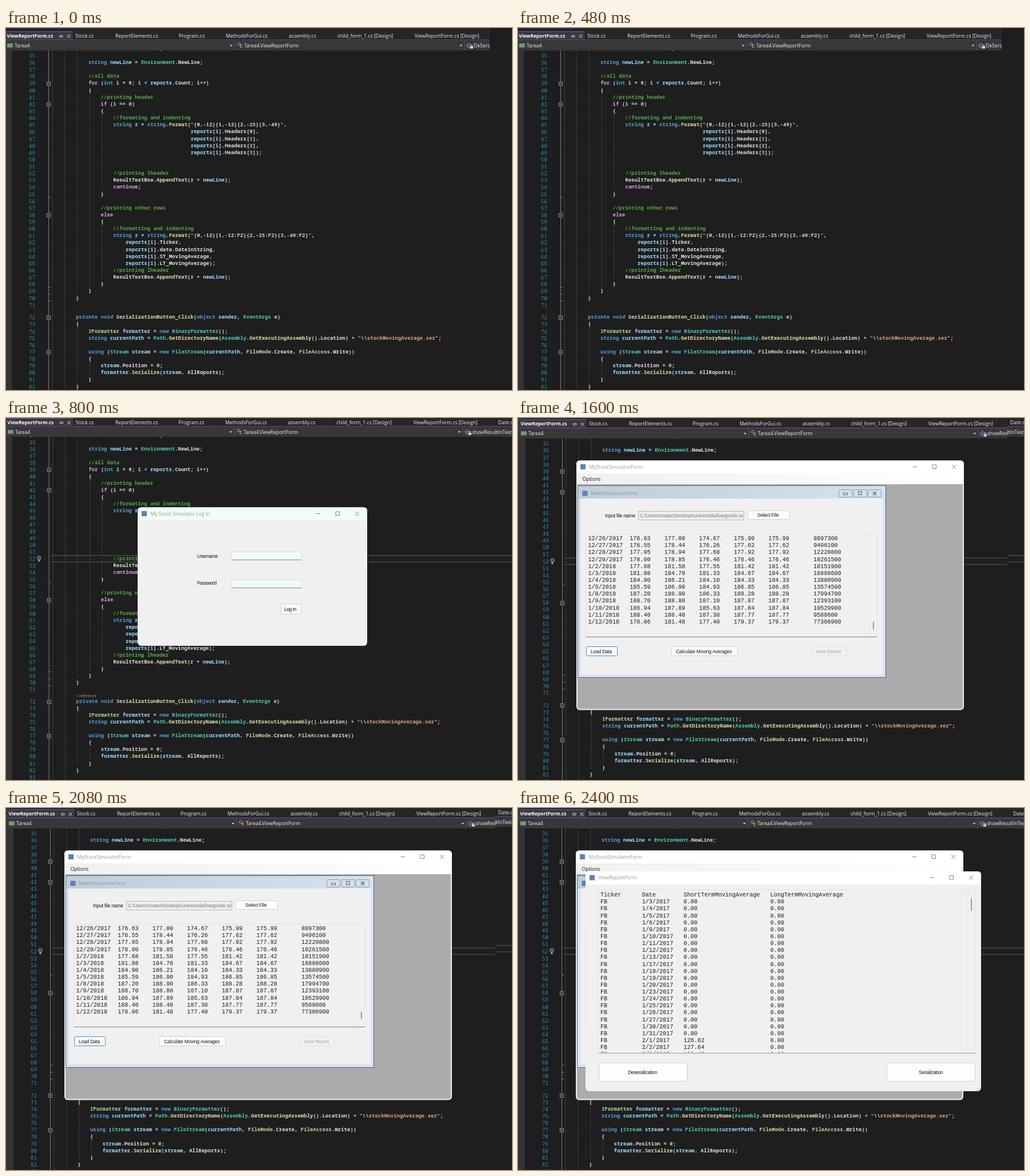
Write an HTML page that moves like this. It is 884 px wide and 634 px high and loops after 3.2 s.

```html
<!DOCTYPE html>
<html lang="en">
<head>
<meta charset="utf-8">
<title>Stock simulator demo</title>
<style>
html, body { margin: 0; width: 100%; height: 100%; overflow: hidden; background: #1e1e1e; }
svg { display: block; width: 884px; height: 634px; }
text { white-space: pre; }
.code { font: 600 9.033px "Noto Sans Mono", "DejaVu Sans Mono", monospace; fill: #dcdcdc; }
.num { font: 500 9.033px "Noto Sans Mono", "DejaVu Sans Mono", monospace; fill: #2b91af; }
.ui { font: 8.62px "Open Sans", "Noto Sans", sans-serif; fill: #f0f0f0; }
.form { font: 8.3px "Liberation Sans", Arial, sans-serif; letter-spacing: -.12px; fill: #111; }
.data { font: 10.1px "Liberation Mono", "Courier New", monospace; fill: #1c1c1c; }
</style>
</head>
<body>
<svg id="stage" viewBox="0 0 884 634"></svg>
<script>
const LOOP = 3200, HOLD = 800;
const CHAR = 5.42, PITCH = 12.13, FIRST = 34;

const source = String.raw`
    ResultTextBox.Text = "";

    string newLine = Environment.NewLine;

    //all data
    for (int i = 0; i < reports.Count; i++)
    {
        //printing header
        if (i == 0)
        {
            //formating and indenting
            string r = string.Format("{0,-12}{1,-12}{2,-25}{3,-49}",
                                     reports[i].Headers[0],
                                     reports[i].Headers[1],
                                     reports[i].Headers[2],
                                     reports[i].Headers[3]);


            //printing lheader
            ResultTextBox.AppendText(r + newLine);
            continue;
        }

        //printing other rows
        else
        {
            //formatting and indenting
            string r = string.Format("{0,-12}{1,-12:F2}{2,-25:F2}{3,-49:F2}",
                reports[i].Ticker,
                reports[i].date.DateInString,
                reports[i].ST_MovingAverage,
                reports[i].LT_MovingAverage);
            //printing lheader
            ResultTextBox.AppendText(r + newLine);
        }
    }
}

private void SerializationButton_Click(object sender, EventArgs e)
{
    IFormatter formatter = new BinaryFormatter();
    string currentPath = Path.GetDirectoryName(Assembly.GetExecutingAssembly().Location) + "\\stockMovingAverage.ser";

    using (Stream stream = new FileStream(currentPath, FileMode.Create, FileAccess.Write))
    {
        stream.Position = 0;
        formatter.Serialize(stream, AllReports);
    }
}
`.slice(1).split("\n");

const palette = {};
const paint = (color, words) => words.split(" ").forEach(w => palette[w] = color);
paint("#569cd6", "string int private void object new using");
paint("#d8a0df", "for if else continue");
paint("#4ec9b0", "Environment BinaryFormatter Path Assembly EventArgs Stream FileStream");
paint("#b8d7a3", "IFormatter FileMode FileAccess");
paint("#dcdcaa", "Format AppendText SerializationButton_Click GetDirectoryName GetExecutingAssembly Serialize");
paint("#9cdcfe", "newLine i reports r sender e formatter currentPath stream");

const esc = s => s.replace(/&/g, "&amp;").replace(/</g, "&lt;");
const span = (color, s) => `<tspan fill="${color}">${esc(s)}</tspan>`;
const rect = (x, y, w, h, fill, more = "") =>
  `<rect x="${x}" y="${y}" width="${w}" height="${h}" fill="${fill}" ${more}/>`;
const box = (x, y, w, h, fill, stroke, r = 0) =>
  rect(x + .5, y + .5, w - 1, h - 1, fill, `stroke="${stroke}" rx="${r}"`);
const path = (d, stroke, more = "") => `<path d="${d}" fill="none" stroke="${stroke}" ${more}/>`;
// y is the middle of the capitals
const text = (cls, x, y, s, more = "") =>
  `<text xml:space="preserve" class="${cls}" x="${x}" y="${y + 3.1}" ${more}>${s}</text>`;
const fill = c => `style="fill:${c}"`;

function tint(token) {
  if (token.startsWith("//")) return span("#57a64a", token);
  if (token.startsWith('"\\\\')) return span("#d69d85", '"') + span("#ffd68f", "\\\\") + span("#d69d85", token.slice(3));
  if (token.startsWith('"{')) return span("#d69d85", '"') + span("#cfd8bc", token.slice(1, -1)) + span("#d69d85", '"');
  if (token[0] === '"') return span("#d69d85", token);
  if (/^\d/.test(token)) return span("#b5cea8", token);
  return span(palette[token] || "#dcdcdc", token);
}
const highlight = s => s.match(/\/\/.*|"[^"]*"|\w+|[^\w"]+/g).map(tint).join("");

// the method on line 72 sits lower, below its reference note
const lineY = n => n < 72 ? 60 + PITCH * (n - 36) : 506.2 + PITCH * (n - 72);

function codeArea() {
  let out = rect(-10, -20, 920, 720, "#1e1e1e") + rect(-10, -20, 20, 720, "#333333");
  const guide = (x, a, b) => path(`M${x} ${a}V${b}`, "#5c5c5c", 'stroke-dasharray="2.4 2.4"');
  out += guide(81, 39, 660) + guide(102.8, 39, 660);
  out += guide(124.5, 39, lineY(70) - 7) + guide(124.5, lineY(74) - 6, lineY(82) - 7);
  out += guide(146.2, lineY(41) - 6, lineY(69) - 7) + guide(146.2, lineY(79) - 6, lineY(81) - 7);
  out += guide(167.9, lineY(44) - 6, lineY(55) - 7) + guide(167.9, lineY(60) - 6, lineY(68) - 7);
  out += path("M74.5 39V660", "#8a8a8a", 'stroke-width=".9"');
  for (const n of [55, 68, 69, 70]) out += path(`M74.5 ${lineY(n) + 6}h3.5`, "#8a8a8a");
  for (const n of [39, 42, 58, 72, 77]) {
    const y = lineY(n) + 1;
    out += rect(71.5, y - 3, 6, 6, "#1e1e1e", 'stroke="#a5a5a5" stroke-width=".9"') + path(`M73 ${y}h3`, "#d0d0d0", 'stroke-width=".9"');
  }
  source.forEach((s, k) => {
    const n = FIRST + k, y = lineY(n);
    out += text("num", 40, y + 1, n);
    if (s) out += text("code", 122.2 + CHAR * s.search(/\S/), y, highlight(s.trim()));
  });
  return out;
}

function header() {
  const tabs = [[118, 121, "Stock.cs"], [187, 191, "ReportElements.cs"], [298, 302, "Program.cs"],
    [381, 384, "MethodsForGui.cs"], [490, 494, "assembly.cs"], [575, 579, "child_form_1.cs [Design]"],
    [710, 714, "ViewReportForm.cs [Design]"], [860, 863, "Date.cs"]];
  let out = rect(-10, -20, 920, 41, "#272727");
  out += rect(-10, 6.5, 127, 14.5, "#383838") + rect(-10, 6, 127, 1, "#6a5bd0");
  out += text("ui", 1.5, 14, "ViewReportForm.cs", 'style="font-weight:700;font-size:8.4px;fill:#fff"');
  out += path("M92 14.5h3M95 12v5M95 13h4v3h-4", "#d0d0d0", 'stroke-width=".9"');
  out += path("M106.5 11.5l6 6m0 -6l-6 6", "#e8e8e8");
  for (const [edge, x, name] of tabs)
    out += rect(edge - .5, 7, 1, 13, "#1f1f1f") + text("ui", x, 14, name);
  out += rect(-10, 20.4, 920, 1.1, "#6153bb") + rect(-10, 21.5, 920, 17.7, "#383838");
  out += rect(2, 27, 10, 7, "#6f9b72") + text("ui", 15, 31, "Tarea4");
  out += text("ui", 416, 31, "Tarea4.ViewReportForm");
  for (const x of [393.5, 795]) out += `<path d="M${x - 2.5} 29.5h5l-2.5 2.8z" fill="#d8d8d8"/>`;
  for (const x of [400, 801]) out += rect(x - .5, 22, 1, 17, "#555555");
  out += path("M404 28l3 -3 3 3 -3 3zM408 30h5M410 30v4h3", "#d9ad62");
  out += path("M805 29l3.5 -2.5 3.5 2.5v3.5l-3.5 2.5 -3.5 -2.5zM805 29l3.5 2 3.5 -2M808.5 31v4", "#a98bd8", 'stroke-width=".9"');
  return out + rect(811, 32, 5, 4, "#d8d8d8") + path("M812 32v-2h3v2", "#d8d8d8", 'stroke-width=".8"');
}

function caretLine() {
  return path("M78.5 248.8H910M78.5 260H910", "#484848", 'stroke-width="1.5"') +
    '<circle cx="57" cy="253" r="3.3" fill="#4d4a40" stroke="#a39c88"/>' + rect(55.6, 256.5, 2.8, 3, "#a8a8a8") +
    text("ui", 122, 496, "1 reference", 'style="font-size:6.7px;fill:#a0a0a0"');
}

const editor = (matrix, member, caret) =>
  `<g transform="matrix(${matrix})"><use href="#code"/>${caret ? '<use href="#caret"/>' : ""}` +
  `<use href="#header"/>${text("ui", 817, 31, member)}</g>`;

const icon = (x, y) => rect(x - 4.5, y - 4.5, 9, 9, "#5f7fae");

function win(x, y, w, h, bar, title) {
  const r = x + w, m = y + 11;
  return rect(x, y, w, h, "#f0f0f0", 'rx="6"') +
    `<path d="M${x} ${y + 23}v-17q0 -6 6 -6h${w - 12}q6 0 6 6v17z" fill="${bar}"/>` +
    icon(x + 11.5, m) + text("ui", x + 22.5, m, title, fill("#999")) +
    path(`M${r - 89.5} ${m}h7.5M${r - 55} ${m - 3.5}h6.5v6.5h-6.5zM${r - 21} ${m - 3.5}l7 7m0 -7l-7 7`, "#777", 'stroke-width=".9"');
}

const button = (x, y, w, h, tx, label, border = "#cfcfcf", more = "") =>
  box(x, y, w, h, "#fdfdfd", border, 2) + text("form", tx, y + h / 2, label, more);

const field = (x, y, w, h, bg) =>
  box(x, y, w, h, bg, "#d9d9d9", 1) + path(`M${x + 1} ${y + h - .5}h${w - 2}`, "#868686");

function login() {
  const tight = 'style="letter-spacing:-.32px"', mint = "#f0fdf4";
  return win(230, 156.5, 401, 242.5, mint, "My Stock Simulator Log In") +
    text("form", 334, 242, "Username", tight) + field(393, 234, 124, 15, mint) +
    text("form", 334, 288.5, "Password", tight) + field(393, 283, 124, 15, mint) +
    box(480, 325, 36, 19, mint, "#cfcfcf", 2) + text("form", 486, 334.5, "Log In", tight);
}

const prices = `12/26/2017 176.63 177.00 174.67 175.99 8897300
12/27/2017 176.55 178.44 176.26 177.62 9496100
12/28/2017 177.95 178.94 177.68 177.92 12220800
12/29/2017 178.00 178.85 176.46 176.46 10261500
1/2/2018 177.68 181.58 177.55 181.42 18151900
1/3/2018 181.88 184.78 181.33 184.67 16886600
1/4/2018 184.90 186.21 184.10 184.33 13880900
1/5/2018 185.59 186.90 184.93 186.85 13574500
1/8/2018 187.20 188.90 186.33 188.28 17994700
1/9/2018 188.70 188.80 187.10 187.87 12393100
1/10/2018 186.94 187.89 185.63 187.84 10529900
1/11/2018 188.40 188.40 187.38 187.77 9588600
1/12/2018 178.06 181.48 177.40 179.37 77306900`.split("\n").map(s => s.split(" "));

const columns = (cells, widths) => cells.map((c, k) => c.padEnd(widths[k] || 0)).join("");

function mainForm() {
  let out = win(102, 74.5, 677, 437, "#fff", "MyStockSimulatorForm");
  out += rect(102, 97, 677, 19, "url(#menu)") + text("ui", 112.5, 107, "Options", fill("#111"));
  out += '<path d="M104 116H777V505q0 4.5 -4.5 4.5H108.5q-4.5 0 -4.5 -4.5z" fill="#ababab"/>';
  // child window
  out += box(104, 118, 539, 337, "#d7e4f2", "#56616d") + rect(105, 119, 537, 22, "url(#child)");
  out += rect(110, 141, 527, 308, "#f0f0f0") + icon(117, 132) + text("ui", 127, 132, "NewSimulationForm", fill("#8a929b"));
  for (const x of [560, 586, 611]) out += box(x, 125, 24, 14, "#d3e0ee", "#8796a8", 2);
  out += rect(568.5, 131.5, 7, 3, "#fff", 'stroke="#555"') + rect(594.5, 128.5, 6, 6, "#fff", 'stroke="#555"') +
    rect(596.5, 130.5, 2, 2, "#555") + path("M620 129l6 6m0 -6l-6 6", "#555", 'stroke-width="1.3"');
  out += text("form", 152, 170.5, "Input file name") + box(210, 163, 185, 16, "#f0f0f0", "#b4b4b4");
  out += '<g clip-path="url(#pathBox)">' +
    text("form", 213, 170.5, "C:\\Users\\mateo\\Desktop\\Universidad\\segundo semestre", 'style="font-size:8.5px;letter-spacing:-.1px;fill:#777"') + "</g>";
  out += button(401, 162, 74, 16, 418, "Select File");
  out += box(118, 203, 510, 180, "#f0f0f0", "#e2e2e2") + path("M119 383.5H628", "#8a8a8a") + path("M614.5 204V382", "#e4e4e4");
  prices.forEach(([day, open, high, low, close, volume], k) => {
    const row = columns([day, open, high, low, close, close, volume], [12, 10, 10, 10, 10, 13]);
    out += text("data", 122.5, 211 + 12.15 * k, row);
  });
  out += rect(620, 357, 1.6, 13, "#858585");
  out += button(119, 400, 55, 17, 127, "Load Data", "#3a8fd0") + button(268, 400, 116, 17, 276, "Calculate Moving Averages");
  return out + box(513, 400, 61, 17, "#f2f2f2", "#dedede", 2) + text("form", 520.5, 408.5, "View Report", fill("#a9a9a9"));
}

function report() {
  const widths = [12, 12, 25];
  let out = win(118, 111, 691, 385, "#fff", "ViewReportForm");
  out += box(140.5, 143, 659, 287, "#f0f0f0", "#e2e2e2") + path("M785.5 144V429", "#e4e4e4");
  let row = 0;
  const put = cells => out += text("data", 144, 152 + 12.14 * row++, columns(cells, widths));
  out += '<g clip-path="url(#table)">';
  put(["Ticker", "Date", "ShortTermMovingAverage", "LongTermMovingAverage"]);
  const averages = { 32: "126.82", 33: "127.64", 34: "128.45" };
  // days since 31 December: weekdays without the holiday
  for (let d = 3; d < 35; d++) {
    if (d % 7 < 2 || d === 16) continue;
    put(["FB", (d > 31 ? "2/" + (d - 31) : "1/" + d) + "/2017", averages[d] || "0.00", "0.00"]);
  }
  out += "</g>" + path("M141 429.5H799", "#969696") + rect(791.3, 158, 1.6, 22, "#858585");
  out += button(141, 446, 155, 33, 192, "Deserialization", "#cfcfcf", 'style="letter-spacing:-.22px"');
  out += button(644, 446, 155, 33, 700, "Serialization", "#cfcfcf", 'style="letter-spacing:-.22px"');
  for (const [x, y] of [[806, 488], [803, 491], [806, 491], [800, 494], [803, 494]]) out += rect(x - 1, y, 1.4, 1.4, "#aaa");
  return out;
}

const MEMBER = "showResultInTextBox";
const shrunk = "0.9951,0,0,0.992,1,-6";
const scenes = [
  editor("1,0,0,1,0,0", "DeSerializationButton", false) + rect(845, 0, 39, 39.5, "#1e1e1e"),
  editor(shrunk, MEMBER, true) + login(),
  editor(shrunk, MEMBER, true) + `<g clip-path="url(#left)">${editor("1,0,0,1,3,-3.6", MEMBER, true)}</g>` + mainForm(),
  editor("1,0,0,1,2,-3.6", MEMBER, true) + `<g transform="translate(-1)">${mainForm()}</g>` + report()
];

const clip = (id, x, y, w, h) => `<clipPath id="${id}">${rect(x, y, w, h, "#000")}</clipPath>`;
const gradient = (id, a, b) =>
  `<linearGradient id="${id}"><stop stop-color="${a}"/><stop offset="1" stop-color="${b}"/></linearGradient>`;

const stage = document.getElementById("stage");
stage.innerHTML = "<defs>" +
  `<g id="code">${codeArea()}</g><g id="header">${header()}</g><g id="caret">${caretLine()}</g>` +
  clip("left", 0, 0, 855, 634) + clip("pathBox", 212, 163, 181, 15) + clip("table", 141, 144, 644, 283.8) +
  gradient("menu", "#f0f0f0", "#ffffff") + gradient("child", "#bfcddb", "#d5e2f0") + "</defs>" +
  scenes.map(s => `<g class="scene" display="none">${s}</g>`).join("");
const layers = [...stage.querySelectorAll(".scene")];

function draw() {
  const now = Math.floor(performance.now() % LOOP / HOLD);
  layers.forEach((g, k) => g.setAttribute("display", k === now ? "inline" : "none"));
  requestAnimationFrame(draw);
}
draw();
</script>
</body>
</html>
```
